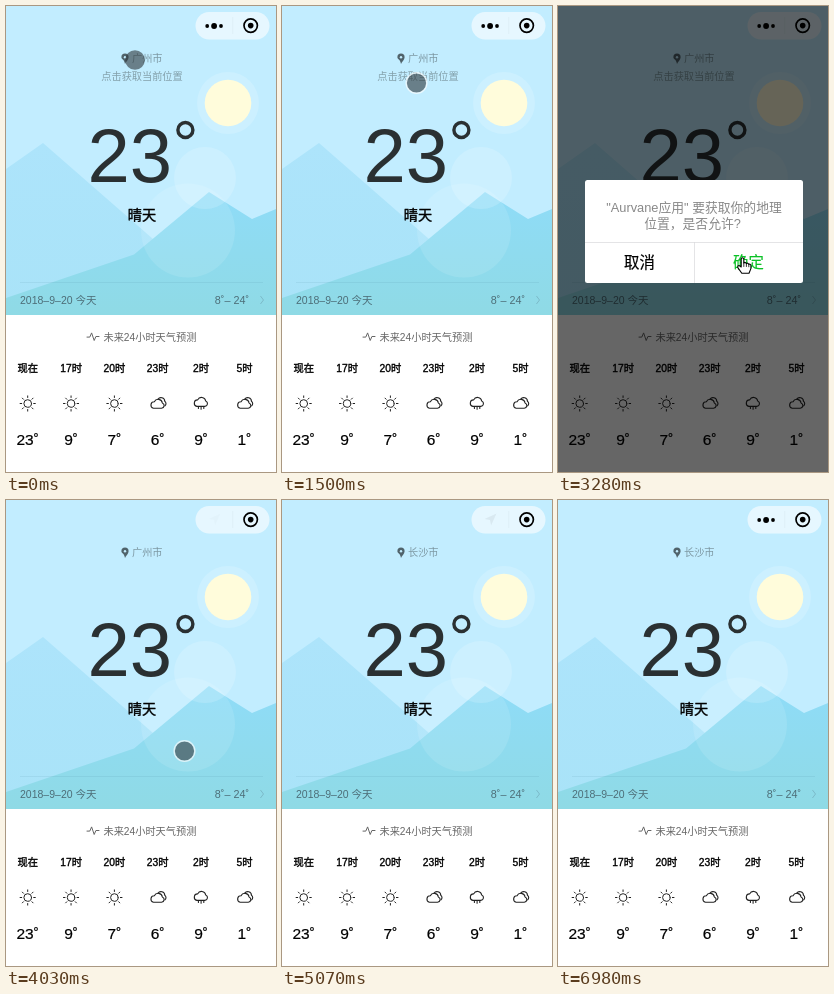
Write an HTML page with a canvas that moves like this. It is 270 by 466 pixels and loops after 7290 ms.

```html
<!DOCTYPE html>
<html lang="zh-CN">
<head>
<meta charset="utf-8">
<title>天气</title>
<style>
  html, body { margin: 0; width: 100%; height: 100%; overflow: hidden; background: #fff; }
  canvas { display: block; width: 270px; height: 466px; }
</style>
</head>
<body>
<canvas id="stage"></canvas>
<script>
const W = 270, H = 466, LOOP = 7290, PULSE_STEP = 147.5, HORIZON = 309;
const DIALOG_OPEN = 2550, DIALOG_CLOSE = 4030, CITY_FOUND = 4770, LOCATING_END = 6980;
const FONT = '"Liberation Sans", "Noto Sans CJK SC", "Noto Sans CJK", sans-serif';

// Held pointer positions: time, x, y, kind
const POINTER = [
  [0, 129, 54, 'dot'], [150, 165, 49, 'dot'], [300, 243, 46, 'dot'], [450, 190, 60, 'dot'],
  [600, 112, 74, 'dot'], [750, 57, 78, 'dot'], [900, 78, 80, 'dot'], [1050, 106, 80, 'dot'],
  [1200, 110, 83, 'dot'], [1350, 126, 80, 'dot'], [1500, 134.5, 77, 'ring'],
  [2850, 160, 140, 'ring'], [3000, 217, 212, 'ring'], [3150, 200, 254, 'hand'],
  [3280, 186, 259, 'hand'], [4030, 178.5, 251, 'ring'], [4330, 0, 0, 'none']
];

const FORECAST = [
  ['现在', 'sun', 23], ['17时', 'sun', 9], ['20时', 'sun', 7],
  ['23时', 'cloud', 6], ['2时', 'rain', 9], ['5时', 'cloud', 1]
];

const ARROW = new Path2D('M6-6L-6-.6L-.6.6L.6 6Z');
const CLOUD = new Path2D('M-4.3 4.8H3.8a2.8 2.8 0 0 0 .8-5.4A4.2 4.2 0 0 0-3.4-1.7A3.3 3.3 0 0 0-4.3 4.8Z');
const BEHIND = new Path2D('M.2-4.2A3.7 3.7 0 0 1 7-2.2A2.9 2.9 0 0 1 7.2 2.4');
const DROPS = new Path2D('M-2.7 4.6v1.6M0 5.2v1.8M2.7 4.6v1.6');
const PIN = new Path2D('M0 5.4C-1-.1-3.6 1.2-3.6-1.3A3.6 3.6 0 0 1 3.6-1.3C3.6 1.2 1 3 0 5.4Z');
const BEAT = new Path2D('M-6 .6H-3.2L-1.4-3.6L1.2 4L2.9 0H6');
const HAND = new Path2D('M-2.8 2V-6.2Q-1.5-8.4-.2-6.2V-2Q1.2-3.4 2.4-1.4Q3.8-2.6 4.8-.7Q6.8-1.4 6.9.8V3.6L5 8.2H-2.2L-6.2 2.6Q-6.6.1-4.5.7Z');

const canvas = document.getElementById('stage');
const ctx = canvas.getContext('2d');
const ratio = window.devicePixelRatio || 1;
canvas.width = W * ratio;
canvas.height = H * ratio;

// A thin outline gives medium weight.
function text(str, x, y, size, color, align = 'left', outline = 0) {
  ctx.font = `${size}px ${FONT}`;
  ctx.textAlign = align;
  ctx.fillStyle = ctx.strokeStyle = color;
  ctx.fillText(str, x, y);
  if (outline) {
    ctx.lineWidth = outline;
    ctx.strokeText(str, x, y);
  }
}

function disc(x, y, r, color) {
  ctx.fillStyle = color;
  ctx.beginPath();
  ctx.arc(x, y, r, 0, Math.PI * 2);
  ctx.fill();
}

function ring(x, y, r, color, width) {
  ctx.strokeStyle = color;
  ctx.lineWidth = width;
  ctx.beginPath();
  ctx.arc(x, y, r, 0, Math.PI * 2);
  ctx.stroke();
}

function polygon(points, fill) {
  ctx.fillStyle = fill;
  ctx.beginPath();
  points.forEach(([x, y]) => ctx.lineTo(x, y));
  ctx.fill();
}

function roundBox(x, y, w, h, r, color) {
  ctx.fillStyle = color;
  ctx.beginPath();
  ctx.roundRect(x, y, w, h, r);
  ctx.fill();
}

function rect(x, y, w, h, color) {
  ctx.fillStyle = color;
  ctx.fillRect(x, y, w, h);
}

function fade(top, bottom, from, to) {
  const g = ctx.createLinearGradient(0, top, 0, bottom);
  g.addColorStop(0, from);
  g.addColorStop(1, to);
  return g;
}

function at(x, y, draw) {
  ctx.save();
  ctx.translate(x, y);
  draw();
  ctx.restore();
}

function line(path, color, width) {
  ctx.strokeStyle = color;
  ctx.lineWidth = width;
  ctx.lineCap = ctx.lineJoin = 'round';
  ctx.stroke(path);
}

function shape(path, color) {
  ctx.fillStyle = color;
  ctx.fill(path);
}

function drawScenery() {
  rect(0, 0, W, HORIZON, '#c2edff');
  polygon([[0, 163], [37, 137], [147, 233], [147, HORIZON], [0, HORIZON]],
    fade(137, HORIZON, '#ade4fb', '#a9e3f8'));
  polygon([[0, 292], [128, 248.5], [203, 186], [246, 213], [270, 203], [270, HORIZON], [0, HORIZON]],
    fade(186, HORIZON, '#8fdcf8', '#8fdae5'));
  disc(199, 172, 31, 'rgba(255,255,255,.16)');
  disc(182, 224.5, 47, 'rgba(255,255,255,.11)');
  disc(222, 97, 31, 'rgba(255,255,255,.16)');
  disc(222, 97, 23.3, '#fffcdb');
  rect(0, HORIZON, W, H, '#fff');
}

function drawCurrent(t) {
  const asking = t < DIALOG_CLOSE;
  at(119, 52.5, () => {
    shape(PIN, '#50636b');
    disc(0, -1.3, 1.2, '#c2edff');
  });
  text(t < CITY_FOUND ? '广州市' : '长沙市', 126, 56, 10.2, '#7d98a3');
  if (asking) text('点击获取当前位置', 136, 74, 10.2, '#83a0ab', 'center');

  text('23', 81.5, 176, 76, '#2a3032');
  ring(179.4, 124, 7.5, '#2a3032', 3.4);
  text('晴天', 136, 214, 14.2, '#000', 'center', .4);

  rect(14, 276, 243, .7, 'rgba(60,110,125,.13)');
  text('2018–9–20 今天', 14, 297.5, 10.5, '#4d6e78');
  text('8˚– 24˚', 243, 297.5, 10.8, '#4d6e78', 'right');
  line(new Path2D('M254.7 290.3l2.8 3.7l-2.8 3.7'), '#76b2c0', .8);
}

function drawSunIcon() {
  ring(0, 0, 3.8, '#222', 1);
  const rays = new Path2D();
  for (let i = 0; i < 8; i++) {
    const c = Math.cos(i * Math.PI / 4), s = Math.sin(i * Math.PI / 4);
    rays.moveTo(c * 6, s * 6);
    rays.lineTo(c * 7.6, s * 7.6);
  }
  line(rays, '#222', 1);
}

function drawCloudIcon(kind) {
  if (kind === 'rain') {
    ctx.translate(0, -1.3);
    line(DROPS, '#222', 1.1);
    ctx.translate(0, -.6);
  } else {
    line(BEHIND, '#222', 1.1);
  }
  line(CLOUD, '#222', 1.1);
}

function drawForecast() {
  at(87, 330.5, () => line(BEAT, '#666', 1));
  text('未来24小时天气预测', 97.5, 334.8, 10.2, '#666');
  FORECAST.forEach(([hour, icon, degrees], i) => {
    const x = 21.7 + i * 43.35;
    text(hour, x, 365.5, 10.3, '#000', 'center', .35);
    at(x, 397.5, () => icon === 'sun' ? drawSunIcon() : drawCloudIcon(icon));
    text(degrees + '˚', x, 439, 15.5, '#000', 'center', .2);
  });
}

function drawCapsule(t) {
  roundBox(189.5, 6, 74, 27.5, 13.75, 'rgba(255,255,255,.6)');
  rect(226.5, 11, .7, 17, 'rgba(0,0,0,.05)');
  if (t >= DIALOG_CLOSE && t < LOCATING_END) {
    const step = Math.floor((t - DIALOG_CLOSE) / PULSE_STEP);
    const alpha = (1 - Math.cos((step + .3) / 7.9 * Math.PI * 2)) / 2;
    at(208.5, 19.5, () => shape(ARROW, `rgba(0,0,0,${alpha})`));
  } else {
    disc(201.2, 20, 1.9, '#000');
    disc(208.1, 20, 2.9, '#000');
    disc(215, 20, 1.9, '#000');
  }
  ring(244.7, 19.6, 6.7, '#000', 1.7);
  disc(244.7, 19.6, 2.8, '#000');
}

function drawDialog() {
  rect(0, 0, W, H, 'rgba(0,0,0,.6)');
  roundBox(27, 174, 218, 103, 2.5, '#fff');
  text('"Aurvane应用" 要获取你的地理', 136, 205.8, 12.8, '#888', 'center');
  text('位置，是否允许?', 134.5, 222, 12.8, '#888', 'center');
  rect(27, 236, 218, .7, '#d9d9dc');
  rect(136, 236, .7, 41, '#d9d9dc');
  text('取消', 81.5, 261.7, 15.4, '#000', 'center', .2);
  text('确定', 190.5, 261.7, 15.4, '#0bc126', 'center', .2);
}

function drawPointer(t) {
  const [, x, y, kind] = POINTER.findLast(([start]) => start <= t);
  if (kind === 'hand') {
    at(x, y, () => {
      shape(HAND, '#fff');
      line(HAND, '#000', 1.1);
      line(new Path2D('M-.2-2V1.5M2.4-1.4V1.5M4.8-.7V1.8'), '#000', .8);
    });
  } else if (kind !== 'none') {
    disc(x, y, 9.8, 'rgba(50,60,65,.62)');
    if (kind === 'ring') ring(x, y, 10.3, 'rgba(255,255,255,.65)', 1.5);
  }
}

function render(now) {
  const t = now % LOOP;
  ctx.setTransform(ratio, 0, 0, ratio, 0, 0);
  drawScenery();
  drawCurrent(t);
  drawForecast();
  drawCapsule(t);
  if (t >= DIALOG_OPEN && t < DIALOG_CLOSE) drawDialog();
  drawPointer(t);
}

const start = performance.now();
function tick() {
  render(performance.now() - start);
  requestAnimationFrame(tick);
}
tick();
</script>
</body>
</html>
```
